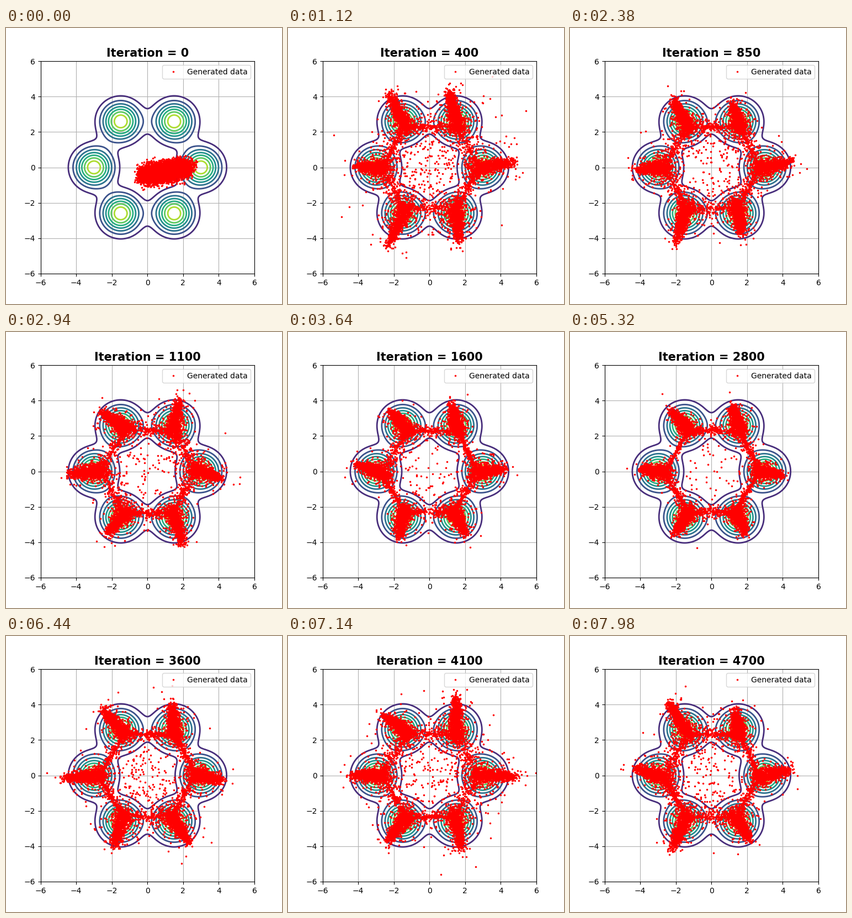
Recreate the animation shown at these times as a matplotlib script. Size 500 by 500 pixels, loop 8000 ms.

```python
import matplotlib.pyplot as plt
import numpy as np
from matplotlib.animation import FuncAnimation

TICK = 40        # ms per animation frame
HOLD = 140       # ms each training snapshot stays
LOOP = 8000
STEPS = LOOP // HOLD + 1
COUNT = 8000
SETTLE = 8       # snapshots until the cloud has spread over all modes

ANGLES = np.arange(6) * np.pi / 3
MODES = 3 * np.exp(1j * ANGLES)
LEAN = np.radians([-3, 32, 12, -5, 4, -10])   # mean tilt of each streak

seeds = np.random.default_rng(4)
RATES = seeds.uniform(0.4, 0.8, (3, 6))
PHASES = seeds.uniform(0, 2 * np.pi, (3, 6))


def density(x, y, var=0.5):
    z = x + 1j * y
    return sum(np.exp(-abs(z - m) ** 2 / (2 * var)) for m in MODES) / (2 * np.pi * var)


def noise(rng, n):
    return rng.normal(size=n) + 1j * rng.normal(size=n)


def energy(step):
    """How far the generator overshoots: strong early and once more late."""
    return np.interp(step, [8, 17, 26, 38, 46, 57], [1, 0.75, 0.45, 0.3, 1, 0.75])


def pose(step):
    """Streaks pivot about their modes; tilt, length and gap width wander."""
    tilt, stretch, gap = np.sin(RATES * step + PHASES)
    heading = np.exp(1j * (ANGLES + LEAN + np.radians(16) * tilt))
    reach = 0.6 + (0.6 + 0.35 * stretch) * energy(step)
    width = (0.16 + 0.22 * energy(step)) * (1 + 0.5 * gap)
    return MODES - 0.5 * heading, MODES + reach * heading, width


def streaks(n, base, tip, rng):
    k = rng.integers(0, 6, n)
    t = 1.3 * rng.beta(1.2, 1.8, n)
    width = 0.23 - 0.1 * np.minimum(t, 1)
    return base[k] + t * (tip - base)[k] + width * noise(rng, n)


def bridges(n, base, tip, width, rng):
    start = base + 0.12 * (tip - base)
    k = rng.integers(0, 6, n)
    u = rng.beta(0.7, 0.7, n)
    line = (1 - u) * start[k] + u * start[(k + 1) % 6]
    return line + width[k] * rng.gamma(1.5, 0.5, n) * noise(rng, n)


def ring(step, rng):
    base, tip, width = pose(step)
    heat = energy(step)
    n_bridge, n_halo = COUNT // 4, COUNT // 16
    n_inner = int(30 + 80 * heat ** 2)
    halo = streaks(n_halo, base, tip, rng)
    halo += (0.25 + 0.3 * heat) * noise(rng, n_halo)
    inner = 1.6 * np.sqrt(rng.random(n_inner)) * np.exp(2j * np.pi * rng.random(n_inner))
    return np.concatenate([
        streaks(COUNT - n_bridge - n_halo - n_inner, base, tip, rng),
        bridges(n_bridge, base, tip, width, rng), halo, inner])


def blob(rng):
    x = -0.8 + 3.8 * rng.beta(3.3, 4, COUNT)
    y = -0.4 + 0.17 * x + 0.25 * rng.normal(size=COUNT)
    return x + 1j * y


def samples(step):
    rng = np.random.default_rng(step + 11)
    grow = 1 - (1 - min(step / SETTLE, 1)) ** 2.5
    return (1 - grow) * blob(rng) + grow * ring(step, rng)


def iteration(step):
    return 50 * min(step, 20) + 100 * max(step - 20, 0)


CLOUDS = [samples(s) for s in range(STEPS)]

fig, ax = plt.subplots(figsize=(5, 5), dpi=100)
gx, gy = np.meshgrid(*[np.linspace(-6, 6, 200)] * 2)
ax.contour(gx, gy, density(gx, gy), levels=np.linspace(0, 0.32, 9), linewidths=2)
dots, = ax.plot([], [], "r.", markersize=3, label="Generated data")
ax.set(xlim=(-6, 6), ylim=(-6, 6))
ax.grid(True)
ax.legend(loc="upper right")
title = ax.set_title("", fontsize=15, fontweight="bold")


def update(i):
    step = min((i * TICK + TICK // 2) // HOLD, STEPS - 1)
    cloud = CLOUDS[step]
    dots.set_data(cloud.real, cloud.imag)
    title.set_text(f"Iteration = {iteration(step)}")
    return dots, title


anim = FuncAnimation(fig, update, frames=LOOP // TICK, interval=TICK,
                     repeat=True, repeat_delay=0, blit=False)
plt.show()
```
